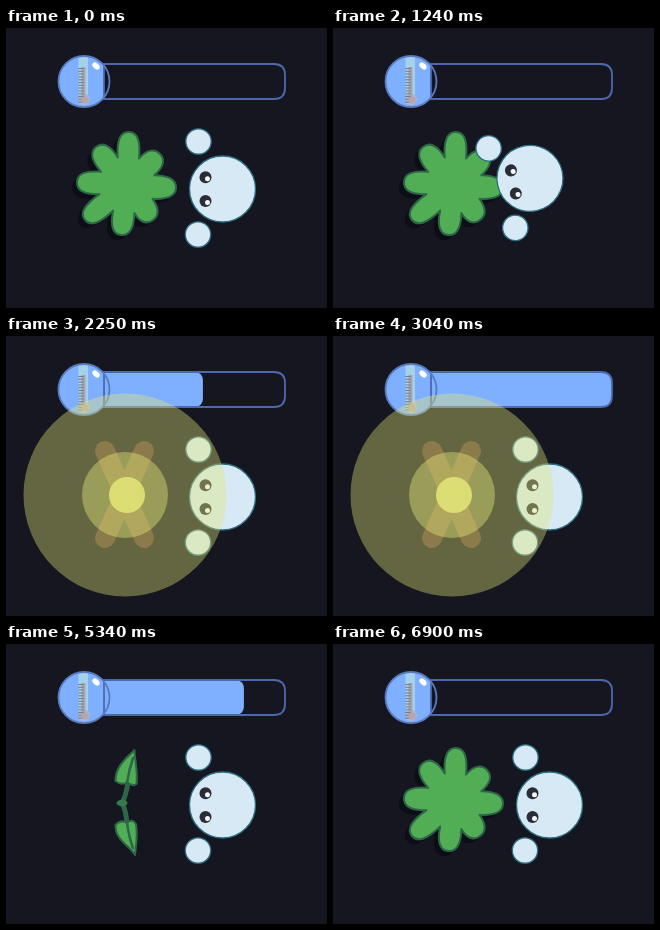
These frames come from a looping animation (321 by 280 pixels, 7.68 s). An HTML page:

```html
<!DOCTYPE html>
<html lang="en">
<head>
<meta charset="utf-8">
<title>Warmth</title>
<style>
html, body { margin: 0; width: 100%; height: 100%; overflow: hidden; background: #161621; }
svg { display: block; width: 100vw; height: 100vh; }
.leaf { fill: #52ae55; stroke: #2d6748; stroke-width: 2; stroke-linejoin: round; }
.stem { fill: none; stroke: #2d6748; stroke-linecap: round; }
.skin { fill: #d7e9f5; stroke: #2d6f82; stroke-width: 1.3; }
.glow { fill: #e1e476; }
</style>
</head>
<body>
<svg viewBox="0 0 321 280">
  <defs>
    <path id="bushShape"/>
    <clipPath id="barClip"><path d="M98 36H268Q279 36 279 47V60Q279 71 268 71H98Z"/></clipPath>
    <g id="eye">
      <circle r="6" fill="#2a2d36"/>
      <circle cx="2" cy="1.5" r="2.5" fill="#f5f9fb"/>
    </g>
  </defs>

  <g id="gauge">
    <circle cx="78" cy="53.5" r="25.5" fill="#7fb0ff"/>
    <path d="M98 36H268Q279 36 279 47V60Q279 71 268 71H98Z" fill="#161621"/>
    <g clip-path="url(#barClip)"><rect id="level" x="78" y="36" height="35" rx="8" fill="#7fb0ff"/></g>
    <path d="M98 36H268Q279 36 279 47V60Q279 71 268 71H98Z" fill="none" stroke="#4d68ad" stroke-width="1.8"/>
    <path d="M72.5 29Q77 27 82 29V68H72.5Z" fill="#a5d2ea"/>
    <circle cx="78" cy="71.5" r="6" fill="#a9b7d0"/>
    <path d="M77.5 39V72" stroke="#a9a5ae" stroke-width="4"/>
    <path d="M75 40V76" stroke="#717c8c" stroke-width="5.5" stroke-dasharray="1 1.8"/>
    <circle cx="79" cy="72" r="3.6" fill="#b7a4ad"/>
    <circle cx="78" cy="53.5" r="25.5" fill="none" stroke="#587bbf" stroke-width="1.8"/>
    <ellipse cx="90" cy="38" rx="4.2" ry="2.8" fill="#fff" transform="rotate(42 90 38)"/>
  </g>

  <g id="bush">
    <use href="#bushShape" x="-5" y="5" fill="#0d0d15"/>
    <use href="#bushShape" class="leaf"/>
  </g>

  <path id="logs" d="M99 115L138 202M138 115L99 202" stroke="#57352f" stroke-width="20" stroke-linecap="round"/>

  <g id="player">
    <circle class="skin" id="fist" r="12.7"/>
    <circle class="skin" cx="-24.5" cy="45.5" r="12.7"/>
    <circle class="skin" r="33"/>
    <use href="#eye" x="-17" y="-11.7"/>
    <use href="#eye" x="-17" y="11.9"/>
  </g>

  <g id="light">
    <circle class="glow" cx="119" cy="159" r="101.5" opacity=".39"/>
    <circle class="glow" cx="119" cy="159" r="43" opacity=".43"/>
    <circle class="glow" cx="121" cy="159" r="18" opacity=".9"/>
  </g>

  <g id="sprout">
    <path class="stem" stroke-width="5" d="M122 138Q120 152 116 159Q120 166 121 180"/>
    <path class="leaf" stroke-width="1.5" d="M128.500 106C122 113 109 122 109.500 137Q116 142 121 138Q126 143 130.500 140C132 128 129 118 128.500 106Z"/>
    <path class="leaf" d="M129 211C124 202 109 196 109.500 181Q115 175 121 179Q126 174 130 180C132 191 130 201 129 211Z"/>
    <path class="stem" stroke-width="2.5" d="M121 139Q123 126 127 114M121 179Q123 193 127 204"/>
    <ellipse cx="116" cy="159" rx="5.5" ry="3.3" fill="#347b4b"/>
  </g>
</svg>
<script>
const LOOP = 7680;
const FIRE_ON = 1290, PLANT = 4920, FIRE_OFF = 4950, BLOOM = 6300;
const BAR = [[1300, 98], [3040, 279], [4935, 279], [5340, 238], [6890, 98]];
const PUNCH = { start: 280, length: 1810, reach: 1.19 };

const el = id => document.getElementById(id);
const show = (id, on) => { el(id).style.display = on ? '' : 'none'; };

function bushPath(cx, cy, tips, notch) {
  const polar = tips.map(([x, y]) => [Math.atan2(y - cy, x - cx), Math.hypot(x - cx, y - cy)]);
  const at = (a, r, side = 0) =>
    `${(cx + r * Math.cos(a) - side * Math.sin(a)).toFixed(1)} ${(cy + r * Math.sin(a) + side * Math.cos(a)).toFixed(1)}`;
  const n = polar.length;
  const valley = i => {
    const a = polar[i][0];
    let b = polar[(i + 1) % n][0];
    if (b < a) b += 2 * Math.PI;
    return at((a + b) / 2, notch);
  };
  let d = 'M' + valley(n - 1);
  polar.forEach(([a, r], i) => {
    d += `C${at(a, r * .82, -12)} ${at(a, r, -9)} ${at(a, r)}`;
    d += `C${at(a, r, 9)} ${at(a, r * .82, 12)} ${valley(i)}`;
  });
  return d + 'Z';
}

function lerpTable(table, t) {
  if (t <= table[0][0]) return table[0][1];
  for (let i = 1; i < table.length; i++) {
    const [t0, v0] = table[i - 1], [t1, v1] = table[i];
    if (t < t1) return v0 + (v1 - v0) * (t - t0) / (t1 - t0);
  }
  return table[table.length - 1][1];
}

function draw(t) {
  const burning = t >= FIRE_ON && t < FIRE_OFF;
  show('logs', burning);
  show('light', burning);
  show('bush', t < FIRE_ON || t >= BLOOM);
  show('sprout', t >= PLANT && t < BLOOM);
  el('level').setAttribute('width', lerpTable(BAR, t) - 78);

  const u = Math.min(1, Math.max(0, (t - PUNCH.start) / PUNCH.length));
  const p = PUNCH.reach * Math.sin(Math.PI * u);
  el('player').setAttribute('transform',
    `translate(${216.5 - 16.5 * p} ${161 - 9 * p}) rotate(${-10 * p})`);
  el('fist').setAttribute('cx', -24 - 8.7 * p);
  el('fist').setAttribute('cy', -47.5 + 8.2 * p);
}

el('bushShape').setAttribute('d', bushPath(121, 157, [
  [123, 104], [154, 126], [170, 160], [147, 192],
  [115, 207], [79, 192], [71, 154], [90, 119]
], 29));

const start = performance.now();
function tick() {
  draw((performance.now() - start) % LOOP);
  requestAnimationFrame(tick);
}
tick();
</script>
</body>
</html>
```
